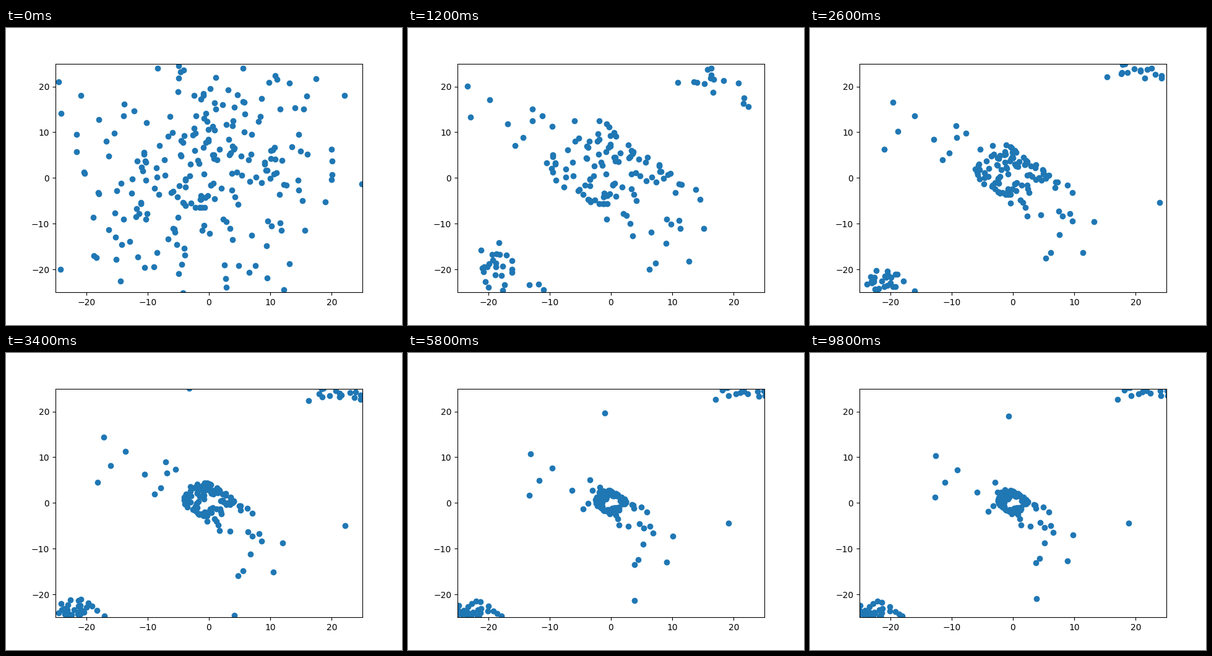
These frames come from a looping animation (640 px wide and 480 px high, 10 s). A matplotlib script:

```python
import numpy as np
import matplotlib.pyplot as plt
from matplotlib.animation import FuncAnimation

FRAMES = 50
INTERVAL = 200
LIMIT = 25

rng = np.random.default_rng(12)


def turn(points):
    """Swap between x, y and the axes along and across the diagonal."""
    x, y = points.T
    return np.column_stack([x + y, x - y]) / np.sqrt(2)


def pick(points, keep, count):
    return points[keep][:count]


def group(start, end, span, power):
    """Points easing from start to end, each with its own span and power."""
    ones = np.ones(len(start))
    return start, end, span * ones, power * ones


def core_group(count=108):
    """A band across the diagonal that shrinks to a small ring with a tail."""
    raw = np.column_stack([rng.uniform(-8, 9.5, 400), rng.normal(-1, 8, 400)])
    band = pick(raw, (raw[:, 1] > -17) & (raw[:, 1] < 15), count)
    start = turn(band)
    radius = np.hypot(*start.T)
    tail = 0.5 * np.maximum(band[:, 1] - 8, 0)
    ring = 1 + 0.13 * radius + tail
    end = start * (ring / radius)[:, None]
    power = 2 + np.clip((radius - 10) / 5, 0, 1.5)
    return group(start, end, 13.5, power)


def stray_group():
    """Slow points on both sides of the ring, given by resting place."""
    end = np.array([
        (-12.6, 10.3), (-9.1, 7.2), (-11.1, 4.5), (-12.7, 1.3), (-5.8, 2.3),
        (-4, -1.8), (-3.2, -.6), (-2.9, 4.5), (-2.5, 2.3), (-1.3, 2.9),
        (-.7, 19), (18.8, -4.4), (9.8, -7), (8.9, -12.7), (3.8, -20.9),
        (3.7, -13.1), (4.3, -12.1), (5.1, -8.8), (6.6, -6.4), (6.1, -4.9),
        (5.1, -5.3), (4.4, -4.3),
    ])
    along, across = turn(end).T
    push = np.where(across < 0, -16, 7.3)
    start = end + turn(np.column_stack([0.5 * along, push]))
    return group(start, end, 17.3, 2.2)


def leaver_group(count=112):
    """Points off the band: some settle in a corner, the rest leave."""
    raw = rng.normal(0, 12.5, (900, 2))
    along = turn(raw)[:, 0]
    inside = np.abs(raw).max(axis=1) < LIMIT + 0.3
    start = pick(raw, inside & ((along < -8) | (along > 9.5)), count)
    upper = start.sum(axis=1, keepdims=True) > 0
    noise = rng.normal(size=start.shape)
    end = np.where(upper, (26, 25.3) + noise * (5, 1.6),
                   (-24, -24.3) + noise * (3.5, 1.3))
    gone = np.abs(end).max(axis=1, keepdims=True) > LIMIT + 0.3
    end += gone * np.where(upper, 14, -14)
    return group(start, end, 5.5, 1)


groups = core_group(), stray_group(), leaver_group()
start, end, span, power = (np.concatenate(parts) for parts in zip(*groups))


def positions(step):
    left = np.exp(-(step / span) ** power)
    return end + (start - end) * left[:, None]


fig, ax = plt.subplots(figsize=(6.4, 4.8), dpi=100)
ax.set_xlim(-LIMIT, LIMIT)
ax.set_ylim(-LIMIT, LIMIT)
dots = ax.scatter(*positions(0).T, color="#1f77b4")


def draw(step):
    dots.set_offsets(positions(step))
    return (dots,)


anim = FuncAnimation(fig, draw, frames=FRAMES, interval=INTERVAL,
                     repeat=True, repeat_delay=0)
plt.show()
```
